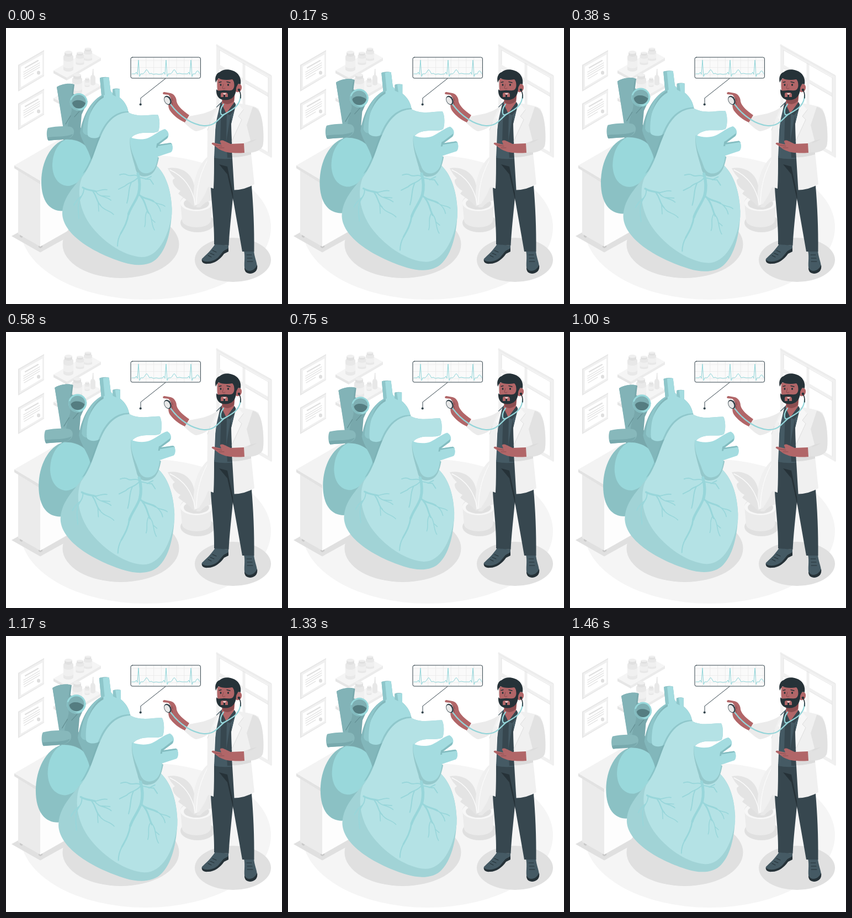
An HTML page that plays this animation: 500x500 px, repeating every 1500 ms.

```html
<!DOCTYPE html>
<html lang="en">
<head>
<meta charset="utf-8">
<title>Heart check-up</title>
<style>
  html, body { margin: 0; width: 100%; height: 100%; overflow: hidden; background: #fff; }
  svg { display: block; width: 100vw; height: 100vh; }
  .line { fill: none; stroke-linecap: round; stroke-linejoin: round; }
</style>
</head>
<body>
<svg viewBox="0 0 500 500">
  <ellipse cx="253" cy="361" rx="227" ry="131" fill="#f5f5f5"/>

  <!-- window -->
  <g class="line">
    <path d="M384 34L478 87V230L384 176Z" stroke="#f0f0f0" stroke-width="6" style="stroke-linejoin:miter"/>
    <path d="M386 69L476 121M431 62V203" stroke="#f0f0f0" stroke-width="5"/>
    <path d="M387 40L475 90V225M387 40V66M387 73L428 97M434 100L475 124" stroke="#e4e4e4" stroke-width="1"/>
    <path d="M381 32L481 87V234" stroke="#e8e8e8" stroke-width="1"/>
  </g>

  <!-- wall certificates -->
  <defs>
    <g id="cert">
      <path d="M22 67L69 40V87L22 115Z" fill="#e6e6e6"/>
      <path d="M24 68L69 42V86L24 112Z" fill="#f0f0f0"/>
      <path d="M27 70L66 48V84L27 107Z" fill="#fff"/>
      <g class="line" stroke="#e0e0e0">
        <path d="M35 72L58 59" stroke-width="2.4"/>
        <path d="M32 80L61 63M32 84L61 67M32 88L61 71M33 92L50 82" stroke-width="1.2"/>
      </g>
      <ellipse cx="59" cy="81" rx="3" ry="3.6" fill="#dedede"/>
    </g>
    <g id="board">
      <path d="M86 77L148 41L172 54L110 90Z" fill="#f5f5f5"/>
      <path d="M86 77L110 90V95L86 82Z" fill="#e6e6e6"/>
      <path d="M110 90L172 54V59L110 95Z" fill="#ebebeb"/>
    </g>
    <g id="jar">
      <path d="M-9 11Q-9 8 -6 8H6Q9 8 9 11V34A9 4 0 0 1 -9 34Z" fill="#e8e8e8"/>
      <path d="M-9 16A9 4 0 0 0 9 16V28A9 4 0 0 1 -9 28Z" fill="#f0f0f0"/>
      <path d="M-7 3V8A7 3 0 0 0 7 8V3Z" fill="#e0e0e0"/>
      <ellipse cy="3" rx="7" ry="3" fill="#efefef"/>
    </g>
  </defs>
  <use href="#cert"/>
  <use href="#cert" y="70"/>

  <!-- shelves -->
  <use href="#board"/>
  <use href="#jar" transform="translate(113 41)"/>
  <use href="#jar" transform="translate(134 43) scale(.83 .64)"/>
  <use href="#jar" transform="translate(148.500 35.500) scale(.83 .64)"/>
  <use href="#board" y="50"/>
  <use href="#jar" transform="translate(129 82)"/>
  <use href="#jar" transform="translate(147 90) scale(.5 .45)"/>
  <path d="M153 90Q153 86 156 85L157 74H158.500L159 85Q162 87 162 90V102Q157 106 153 102Z" fill="#e8e8e8"/>

  <!-- cabinet -->
  <path d="M10 377L62 406.500L135 366L84 336Z" fill="#e0e0e0"/>
  <path d="M25 372h6v6l-3 2l-3-2zM59 392h7v5l-4 2l-3-2z" fill="#c9c9c9"/>
  <path d="M22 256L62 279V396L22 373Z" fill="#ebebeb"/>
  <path d="M62 279L150 230V346L62 396Z" fill="#fdfdfd"/>
  <path d="M15 249L98 201L150 229L62 279Z" fill="#f3f3f3"/>
  <path d="M15 249L62 277V283L15 254Z" fill="#e2e2e2"/>
  <path d="M62 277L150 227V233L62 283Z" fill="#fafafa"/>

  <!-- plant -->
  <ellipse cx="347" cy="353" rx="31" ry="17" fill="#e0e0e0"/>
  <path d="M341 322C336 290 342 250 370 229C376 258 372 290 349 322Z" fill="#f0f0f0"/>
  <path d="M316 315A29 15 0 0 1 374 315L371 349C368 365 322 365 319 349Z" fill="#ebebeb"/>
  <ellipse cx="345" cy="317" rx="29" ry="15" fill="#f7f7f7"/>
  <ellipse cx="345" cy="318" rx="23" ry="11" fill="#e0e0e0"/>
  <path d="M340 324C331 312 318 306 312 300L316 295C307 290 301 282 302 275L306 272C301 268 296 260 293 254C316 250 337 262 341 286C344 299 345 312 346 324Z" fill="#e4e4e4"/>
  <path d="M345 325C350 305 358 290 374 280V312Q362 313 352 325Z" fill="#e9e9e9"/>
  <path d="M341 322C337 290 342 252 370 229C376 258 372 286 350 318Z" fill="#f0f0f0"/>
  <path class="line" d="M297 257C323 269 338 290 343 320M368 234C351 262 345 292 345 320" stroke="#fafafa" stroke-width="1.400"/>

  <ellipse cx="208" cy="392" rx="105.500" ry="61" fill="#e0e0e0"/>
  <ellipse cx="411" cy="420" rx="69" ry="40" fill="#e0e0e0"/>

  <g id="heart">
    <!-- great vein -->
    <path d="M92 107C99 102 116 99 124 102.500L122 119L148 133L137 157L135 180L153 212V240H104V180Z" fill="#78a8ac"/>
    <path d="M92 107C99 102 114 99 122 102C118 117 119 137 119 150C116 163 111 173 112 184L104 184Z" fill="#82b3b7"/>
    <path class="line" d="M124 161L133 151M108 174L117 159" stroke="#638f93" stroke-width="1.100"/>
    <ellipse cx="131.700" cy="134" rx="16" ry="16" fill="#98d8db"/>
    <path d="M116 131C115 146 125 152 136 149C124 147 120 139 119 130Z" fill="#83bbbf"/>
    <ellipse cx="131.700" cy="133.500" rx="13" ry="12.500" fill="#7eafb3"/>
    <path d="M120 136C123 129 137 129 144 136C141 149 123 149 120 136Z" fill="#557d81"/>

    <!-- rear chamber -->
    <path d="M107 202C81 209 64 243 64 278C64 315 80 331.500 101 331.500L150 320L160 236C150 211 130 200 107 202Z" fill="#8bc1c4"/>
    <path d="M108 202C92 210 84 229 84 250C85 276 100 287 115 286C138 281 155 253 155 235C153 214 132 201 108 202Z" fill="#99d8db"/>
    <path d="M76 181C89 178 106 177 117 179C126 182 125 195 116 199C105 204 89 202 77 204C73 200 73 185 76 181Z" fill="#87b8bb"/>
    <path d="M75 198C91 196 108 198 121 192C119 199 110 202 98 202L77 204Q75 202 75 198Z" fill="#78a9ad"/>

    <!-- arch with upper vessels -->
    <path d="M170 90.500Q178 87.500 186.500 89.500L189.500 114L193 119V111Q200 108.500 206 110.500V126C216 134 221 144 222 155L185 205L154 238C149 218 138 208 134 190C138 163 151 134 173 122Z" fill="#82b7bb"/>
    <path d="M175 90.500Q181 88.500 186.500 89.500L189.500 114L194 119V111.500Q200 109.500 206 110.500V126C216 134 221 144 222 156C199 163 190 172 179 189C170 201 156 202 149 196C140 180 153 139 177 126Z" fill="#a4dce0"/>
    <path d="M170 90.500Q173 89 176 89.500L179 121C157 132 146 160 148 194Q141 194 139 187C141 159 153 134 173 122Z" fill="#8ec6ca"/>
    <path d="M193 111Q195 110 197 110L199 124L193 121Z" fill="#8ec6ca"/>
    <path d="M222 151C197 150 181 169 172 188C159 215 157 237 139 264L153 253L190 190L224 160Z" fill="#75adb1" opacity=".45"/>

    <!-- front chamber -->
    <path d="M222 153C198 154 184 170 174 191C160 220 158 244 137 270C121 290 102 309 102 337C104 376 162 409 214 425C235 431.500 261 432 275 416C294 396 300 358 300.500 327C299 292 289 263 270 247L226 203C226 196 236 191 248 190C259 189.500 270 191 276 187C279 180 279 164 275 157C262 156 240 163 222 153Z" fill="#a1d3d6"/>
    <path d="M222 153C198 154 184 170 174 191C160 220 158 244 138 270C129 291 130 328 156 361C180 391 216 413 245 415C274 416 294 381 300.500 337C301 296 289 263 270 247L226 203C226 196 236 191 248 190C259 189.500 270 191 276 187C279 180 279 164 275 157C262 156 240 163 222 153Z" fill="#b4e2e5"/>

    <!-- side chamber -->
    <path d="M225 198C222 215 230 237 234 252C236 265 244 271 256 268C270 265 274 250 277 235L240 210Z" fill="#94c8cb"/>
    <path d="M225 198C235 202 248 203 258 199C269 194 279 185 288 183C295 187 296 194 293 199L277 211L298 208C303 212 303 222 299 225L275 233C273 248 270 258 260 262C249 266 241 260 238 250C233 234 223 219 225 198Z" fill="#a4dce0"/>
    <path d="M274 207L293 193Q294 197 292 200L277 211L298 208Q301 209 301 212L272 217Q273 210 274 207Z" fill="#84bdc1"/>
    <path d="M270 203L289 188Q294 189 293 195L276 208Q269 212 270 203ZM275 214L300 210Q303 215 301 220L276 228Z" fill="#a4dce0"/>

    <!-- coronary vessels -->
    <g class="line" stroke="#98d6da">
      <path d="M239 264C243 278 243 289 240 301" stroke-width="5"/>
      <path d="M240 300C235 315 226 324 222 337" stroke-width="4.200"/>
      <path d="M222 336C220 352 213 363 208 372" stroke-width="2.800"/>
      <path d="M208 372Q202 383 202 395M238 268C231 264 226 270 219 266Q214 263 206 266" stroke-width="1.900"/>
      <path d="M239 271C230 281 222 279 216 286L204 292M227 280C221 292 224 300 219 317M243 271C251 272 255 275 261 274L267 283M253 274L263 269" stroke-width="1.900"/>
      <path d="M241 302C250 310 260 309 267 314" stroke-width="3"/>
      <path d="M266 313C274 321 281 317 288 323M269 315Q278 322 280 332" stroke-width="1.600"/>
      <path d="M245 306C253 315 253 326 258 335" stroke-width="2.800"/>
      <path d="M258 334C266 342 262 355 269 366M256 331C249 342 255 350 251 360M263 346L270 352" stroke-width="1.500"/>
      <path d="M139 289C147 294 156 294 163 296" stroke-width="3.200"/>
      <path d="M161 296C169 296 174 291 183 293M163 297C170 307 181 304 190 312M174 304L188 305" stroke-width="1.700"/>
      <path d="M157 295C166 307 163 313 171 321" stroke-width="2.200"/>
      <path d="M170 320C178 332 187 329 195 338M167 315L168 332" stroke-width="1.500"/>
      <path d="M141 290C142 303 133 306 132 316C129 328 132 335 132 345M136 305Q126 313 123 321" stroke-width="1.800"/>
    </g>
  </g>

  <!-- pulse monitor -->
  <rect x="226" y="53" width="126.500" height="38" rx="3" fill="#fafafa"/>
  <g class="line">
    <path id="grid" stroke="#e8e8e8" stroke-width=".7"/>
    <path id="pulse" stroke="#8fd5d9" stroke-width="1"/>
    <rect x="226" y="53" width="126.500" height="38" rx="3" stroke="#37474f" stroke-width="1"/>
    <path d="M289 91.500L244 127V138" stroke="#37474f" stroke-width="1"/>
  </g>
  <circle cx="243.700" cy="138.500" r="2.100" fill="#37474f"/>

  <!-- doctor: legs and shoes -->
  <path d="M379 391L403 394L403 404L395 408C389 417 381 425 367 426C358 427 353 423 355 418C361 412 371 404 379 391Z" fill="#455a64"/>
  <path d="M355 420C362 426 376 423 384 416L394 404L403 399V405L395 409C388 419 378 427 366 427C358 428 354 424 355 420Z" fill="#263238"/>
  <path d="M431 403H449C450 416 455 424 455 434C453 445 438 448 433 439C430 428 434 417 431 403Z" fill="#455a64"/>
  <path d="M432 434C437 444 450 441 455 429C457 440 449 445 442 445C434 444 432 440 432 434Z" fill="#263238"/>
  <path class="line" d="M374 403l7 3M370 408l7 3M366 412l6 3M436 411h9M437 417h9M437 423h10" stroke="#263238" stroke-width="1.100"/>
  <path d="M377 232H412L445 286C448 322 450 361 449.500 405H428L411 308C408 340 405 366 403.500 394L377 392C378 356 372 315 371 288Z" fill="#37474f"/>
  <path d="M386 247L401 251L411 299L412 314L401 265Z" fill="#263238"/>

  <!-- torso -->
  <path d="M381 143L391 133L414 135L424 150L412 236Q394 239 377 235Z" fill="#455a64"/>
  <path d="M390 145L400 152L399 205L388 206ZM407 158L399 205L401 235H411V190Z" fill="#37474f"/>
  <path d="M392 112L415 115L413 136L399 155L391 139Z" fill="#b16668"/>
  <path d="M392 127C402 131 410 125 414 118L413 132C405 140 397 139 392 134Z" fill="#8b4d50"/>
  <path d="M390 136L399 155L390 157L386 143ZM414 134L418 144L406 158L399 155Z" fill="#37474f"/>

  <!-- coat -->
  <path d="M388 138C380 147 367 152 357 155L332 160L322 171C332 180 340 187 345 187C357 185 367 178 377 171L383 150Z" fill="#ebebeb"/>
  <path d="M388 138C383 152 379 168 378 188C376 221 378 252 376 291L364 287C364 252 365 217 365 184C373 166 376 149 388 138Z" fill="#f0f0f0"/>
  <path d="M417 136C434 138 450 141 457 146C464 158 467 184 466 208C465 220 453 225 444 226L450 283Q433 293 413.500 293.500L409.500 227L408.500 173Z" fill="#f0f0f0"/>
  <path d="M447 143C458 144 463 157 465 174C467 190 467 207 465 214C460 225 443 226 431 227L430 209L443 204L436 176Z" fill="#e2e2e2"/>
  <path d="M443 204L455 201Q448 206 437 209ZM410 227L431 226L444 225V229Q424 235 410 234Z" fill="#dcdcdc"/>
  <path d="M419 136L430 148L421 160L427 166L409 205L408 174L414 151Z" fill="#f7f7f7"/>
  <path class="line" d="M430 148L421 160L427 166L409 205M365 185Q368 177 370 171" stroke="#dedede" stroke-width="1"/>
  <path d="M388 138L382 151L376 163L380 165L378 190L382 164Z" fill="#f7f7f7"/>

  <!-- hands -->
  <path d="M332 158L324 171C314 167 304 159 298 151C294 146 293 138 296 134L299 126L294 121L285 120C283 118 285 116 287 116L298 118C304 119 309 126 309 133C311 142 321 150 332 158Z" fill="#b16668"/>
  <path class="line" d="M296 125Q302 126 302 132M296 131Q303 133 301 139M296 137Q302 141 304 145" stroke="#874a4e" stroke-width="1"/>
  <path d="M431 209L432 226C419 227 403 227 394 223C386 221 381 215 374 211C371 209 374 207 377 208L390 211L388 206C387 204 391 203 394 204L407 210Z" fill="#b16668"/>
  <path class="line" d="M379 212L391 214M386 217L395 217" stroke="#874a4e" stroke-width=".9"/>

  <!-- head -->
  <path d="M383 92C382 105 382 118 389 127L407 128L416 115C422 119 428 113 427 106C426 101 421 100 418 103L415 88Z" fill="#b16668"/>
  <path d="M380 99C377 89 382 81 387 80C392 75 402 74 410 77C421 80 427 91 425 102C421 100 419 102 417 106L414 104C414 99 412 95 410 93C400 95 390 94 385 91Q382 94 380 99Z" fill="#263238"/>
  <path d="M381 111C384 115 388 113 393 113C398 112 404 115 410 112C414 109 414 103 413 97L420 101C420 104 417 106 417 109C417 123 409 130.500 398 130.500C387 131 380 124 381 111Z" fill="#263238"/>
  <path d="M389 125V120Q389 117 392 117H399Q402 118 402 121V125H397V121H394V125Z" fill="#b16668"/>
  <path d="M393 118H399Q398 121 396 121Q394 121 393 118Z" fill="#e8cfcf"/>
  <ellipse cx="389" cy="103" rx="1.400" ry="2" fill="#263238"/>
  <ellipse cx="402.500" cy="103" rx="1.600" ry="2.100" fill="#263238"/>
  <path class="line" d="M386 98.500L390 97.500M400 97.500L406 99" stroke="#263238" stroke-width="1.300"/>
  <path class="line" d="M394 102L392 109Q394 111 397 109" stroke="#874a4e" stroke-width="1"/>

  <!-- stethoscope -->
  <g class="line">
    <path d="M298 138C314 160 337 175 358 177C379 178 384 165 396 156C408 149 424 143 425 122M390 157C386 149 391 142 394 138M390 157Q394 158 398 155" stroke="#94d5d9" stroke-width="2.200"/>
    <path d="M422 113C426 118 425 122 425 127" stroke="#263238" stroke-width="1.600"/>
  </g>
  <circle cx="422" cy="112" r="2.300" fill="#263238"/>
  <g transform="rotate(-28 293 131)">
    <ellipse cx="293" cy="131" rx="6.200" ry="8.800" fill="#37474f"/>
    <ellipse cx="292" cy="131" rx="4.500" ry="7" fill="#e8e8e8"/>
  </g>
</svg>

<script>
const LOOP = 1500, FRAMES = 36;
const START = 862;         // when the beat cycle begins within the loop
const DRAWN = 1.0125;      // scale at which the heart paths are laid out
const CX = 183, CY = 258.5;
const beat = [[0, 1], [.2, 1.1], [.4, 1], [.6, 1.1], [1, 1]];

const byId = id => document.getElementById(id);
const heart = byId('heart');

function drawMonitor() {
  let grid = '';
  for (let x = 240; x < 352; x += 13.8) grid += `M${x} 53.500V90.500`;
  for (let y = 59; y < 91; y += 12.5) grid += `M226.500 ${y}H352`;
  byId('grid').setAttribute('d', grid);

  const wave = x => `L${x - 6} 83l2 -3l2 4L${x} 58l2 30l2 -5l4 0q3 -1 5 -6q2 -3 4 1l3 5`;
  byId('pulse').setAttribute('d',
    'M228 83' + wave(240) + 'l3 -1l4 2l5 -1l5 1' + wave(290) + 'l4 -1l5 1' +
    'L329 83l2 -3l2 4L335 58l2 30l2 -5h4q4 -11 8 0');
}

function scaleAt(phase) {
  const i = beat.findIndex(([at]) => at > phase);
  const [a, from] = beat[i - 1], [b, to] = beat[i];
  return from + (to - from) * (phase - a) / (b - a);
}

function draw() {
  // 24 pictures per second; the small lead absorbs rounding of the step times
  const step = Math.floor((performance.now() % LOOP + 2) * FRAMES / LOOP) % FRAMES;
  const phase = (step / FRAMES - START / LOOP + 1) % 1;
  const s = scaleAt(phase) / DRAWN;
  heart.setAttribute('transform', `translate(${CX} ${CY}) scale(${s}) translate(${-CX} ${-CY})`);
  requestAnimationFrame(draw);
}

drawMonitor();
draw();
</script>
</body>
</html>
```
